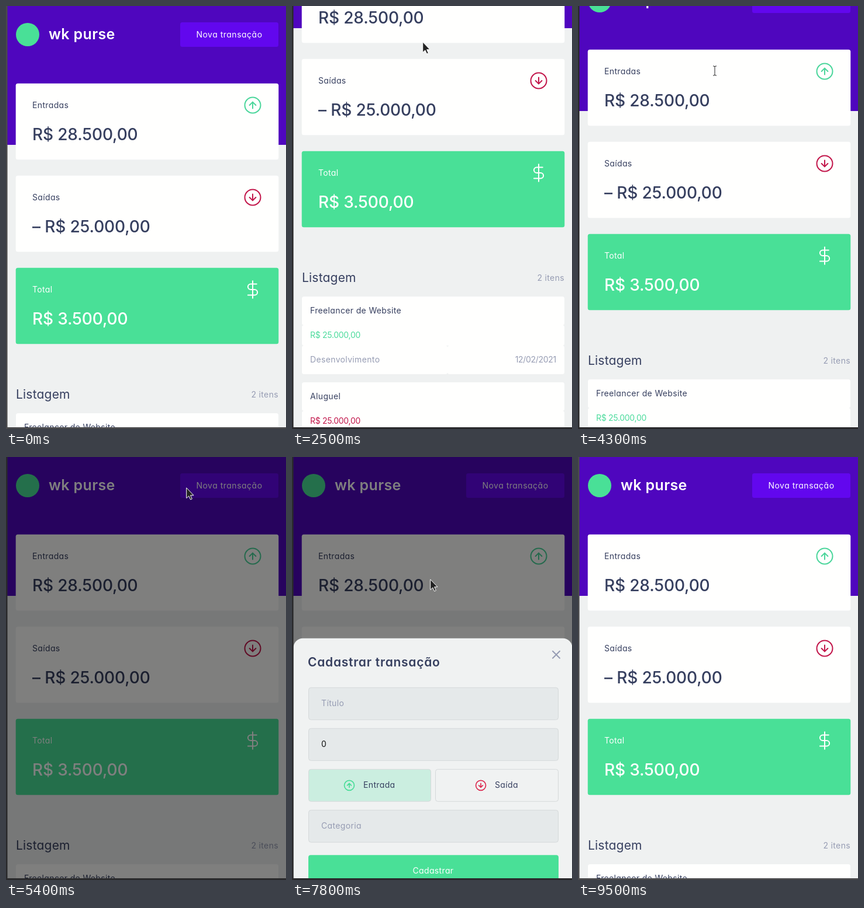
An HTML page that plays this animation: 479x725 px, repeating every 9600 ms.

```html
<!DOCTYPE html>
<html lang="pt-BR">
<head>
<meta charset="utf-8">
<title>Finanças</title>
<style>
  html, body { margin: 0; width: 100%; height: 100%; overflow: hidden; background: #eff1f1; }
  svg { display: block; }
  text { font: 400 14px Inter, "Open Sans", sans-serif; font-feature-settings: "cv11"; letter-spacing: .35px; fill: #363f5f; }
  .value { font-size: 28px; font-weight: 500; letter-spacing: -.15px; }
  .brand { font-size: 25px; font-weight: 600; fill: #fff; }
  .heading { font-size: 21px; letter-spacing: .2px; }
  .dialog-title { font-size: 21px; font-weight: 600; letter-spacing: .75px; }
  .figure { letter-spacing: -.3px; }
  .muted { fill: #969cb3; }
  .light { fill: #fff; }
  .income { fill: #4bdb9c; }
  .expense { fill: #c2164a; }
  .middle { text-anchor: middle; }
  .end { text-anchor: end; }
  .icon { fill: none; stroke-linecap: round; stroke-linejoin: round; }
  .field { fill: #e5e9ea; stroke: #d5d9da; }
</style>
</head>
<body>
<svg width="479" height="725" viewBox="0 0 479 725">
  <defs>
    <g id="up"><circle r="10"/><path d="M-4 0L0-4L4 0M0 4V-4"/></g>
    <g id="down"><circle r="10"/><path d="M-4 0L0 4L4 0M0-4V4"/></g>
    <path id="dollar" d="M0-11V11M5-7H-2.5a3.5 3.5 0 0 0 0 7h5a3.5 3.5 0 0 1 0 7H-6"/>
    <path id="beamShape" d="M-3-8H-1L0-7L1-8H3M0-7V7M-3 8H-1L0 7L1 8H3" fill="none"/>
  </defs>
  <rect width="479" height="725" fill="#eff1f1"/>

  <g id="page">
    <rect width="479" height="238" fill="#4f06be"/>
    <circle cx="37" cy="49" r="20" fill="#49e097"/>
    <text class="brand" x="73" y="57">wk purse</text>
    <rect x="298" y="28" width="168" height="42" rx="3.5" fill="#6207ee"/>
    <text class="light middle" x="382" y="54" style="letter-spacing:.5px">Nova transação</text>

    <g id="cards"></g>
    <g class="icon" stroke-width="1.5">
      <use href="#up" transform="translate(422 170) scale(1.35)" stroke="#4bd69b"/>
      <use href="#down" transform="translate(422 328) scale(1.35)" stroke="#c2164a"/>
      <use href="#dollar" transform="translate(422 486) scale(1.35)" stroke="#fff"/>
    </g>

    <text class="heading" x="17" y="673">Listagem</text>
    <text class="muted end" x="466" y="671">2 itens</text>
    <g id="list"></g>
  </g>

  <rect id="shade" width="479" height="722"/>

  <g id="dialog">
    <rect x="2.5" width="477" height="500" rx="16" fill="#f0f2f2"/>
    <text class="dialog-title" x="27" y="48">Cadastrar transação</text>
    <path class="icon" d="M446 22l12 12m0-12l-12 12" stroke="#969cb3" stroke-width="2"/>
    <rect class="field" x="28.5" y="84.5" width="427" height="55" rx="4"/>
    <text class="muted" x="50" y="116">Título</text>
    <rect class="field" x="28.5" y="154.5" width="427" height="55" rx="4"/>
    <text x="50" y="186" style="fill:#111">0</text>
    <rect class="field" x="28.5" y="224.5" width="209" height="55" rx="4" style="fill:#cbeee0"/>
    <rect class="field" x="245.5" y="224.5" width="210" height="55" rx="4" style="fill:none"/>
    <g class="icon" stroke-width="2">
      <use href="#up" transform="translate(98 252) scale(.85)" stroke="#49dd98"/>
      <use href="#down" transform="translate(323 252) scale(.85)" stroke="#dc2a50"/>
    </g>
    <text x="122" y="256">Entrada</text>
    <text x="347" y="256">Saída</text>
    <rect class="field" x="28.5" y="294.5" width="427" height="55" rx="4"/>
    <text class="muted" x="50" y="326">Categoria</text>
    <rect x="28" y="371.5" width="428" height="56" rx="4" fill="#49e097"/>
    <text class="light middle" x="241.5" y="403">Cadastrar</text>
  </g>

  <path id="frame" d="M0 0H2.5V722H479V725H0Z"/>

  <g id="cursor">
    <path id="arrow" d="M.7 .8V18.6L4.8 14.8L7.6 21L10.3 19.8L7.6 13.7H13Z" fill="#222" stroke="#fff"/>
    <g id="beam">
      <use href="#beamShape" stroke="#fff" stroke-width="3"/>
      <use href="#beamShape" stroke="#222"/>
    </g>
  </g>
</svg>

<script>
const LOOP = 9600, STEP = 100;
const el = id => document.getElementById(id);
const text = (x, y, cls, content) => `<text x="${x}" y="${y}" class="${cls}">${content}</text>`;
const box = (x, y, w, h, fill = '#fffffe') =>
  `<rect x="${x}" y="${y}" width="${w}" height="${h}" rx="3.5" fill="${fill}"/>`;

el('cards').innerHTML = [
  ['Entradas', 'R$ 28.500,00'],
  ['Saídas', '– R$ 25.000,00'],
  ['Total', 'R$ 3.500,00'],
].map(([label, value], i) => {
  const y = 133 + i * 158, total = i === 2, tone = total ? 'light' : '';
  return box(16.7, y - .3, 449.6, 130.6, total ? '#49e097' : undefined) +
    text(45, y + 42, tone, label) + text(45, y + 97, 'value ' + tone, value);
}).join('');

el('list').innerHTML = [
  ['Freelancer de Website', 'R$ 25.000,00', 'income', 'Desenvolvimento', '12/02/2021', 266],
  ['Aluguel', 'R$ 25.000,00', 'expense', 'Casa', '12/02/2021', 224],
  ['Mesada', 'R$ 3.500,00', 'income', 'Família', '07/04/2021', 229],
].map(([title, amount, kind, category, date, split], i) => {
  const y = 698 + i * 147;
  return box(17, y, 449, 49) + box(17, y + 49, 449, 35) +
    box(17, y + 84, split - 17, 49) + box(split, y + 84, 466 - split, 49) +
    text(31, y + 29, '', title) + text(31, y + 71, 'figure ' + kind, amount) +
    text(31, y + 113, 'muted', category) + text(452, y + 113, 'figure muted end', date);
}).join('');

const linear = k => k;
const smooth = k => k * k * (3 - 2 * k);
const easeOut = k => 1 - (1 - k) ** 3;
const easeIn = k => k ** 4.7;
const ramp = (t, from, to, ease = smooth) => ease(Math.min(1, Math.max(0, (t - from) / (to - from))));
const within = (t, from, to) => t >= from && t < to;
const show = (id, on) => el(id).setAttribute('visibility', on ? 'visible' : 'hidden');
const move = (id, x, y) => el(id).setAttribute('transform', `translate(${x} ${y})`);

// Two wheel strokes down to the end of the page, two back to the top.
const scrollAt = t =>
  200 * ramp(t, 1850, 2500) + 259 * ramp(t, 2600, 3150) -
  235 * ramp(t, 3700, 4050) - 224 * ramp(t, 4100, 4400);

const dialogAt = t =>
  725 - 455.5 * (ramp(t, 5400, 5950, easeOut) - ramp(t, 7500, 8000, easeIn));

const shadeAt = t => t < 8200 ? ramp(t, 5100, 5400) / 2 : 0;

// The pointer visits: page, list, button, backdrop, header.
function pointerAt(t) {
  const list = ramp(t, 2600, 3100), button = ramp(t, 4450, 5000);
  const backdrop = ramp(t, 6500, 7200), header = ramp(t, 8300, 8800);
  return [
    223 + 11 * list + 74 * button - 72 * backdrop - 99 * header,
    61 + 50 * list - 59 * button + 157 * backdrop - 165 * header,
  ];
}

function draw(time) {
  const t = Math.floor(time % LOOP / STEP) * STEP;
  move('page', 0, -Math.round(scrollAt(t)));
  move('dialog', 0, dialogAt(t));
  el('shade').setAttribute('opacity', shadeAt(t));

  const gray = t < 9500 ? Math.round(74 - 32 * ramp(t, 800, 1000, linear)) : 74;
  el('frame').setAttribute('fill', `rgb(${gray},${gray},${gray + 2})`);

  const visible = within(t, 600, 9500);
  const beam = within(t, 3000, 4600) || within(t, 8200, 8400);
  move('cursor', ...pointerAt(t).map(Math.round));
  show('arrow', visible && !beam);
  show('beam', visible && beam);
}

const start = performance.now();
function tick() {
  draw(performance.now() - start);
  requestAnimationFrame(tick);
}
tick();
</script>
</body>
</html>
```
